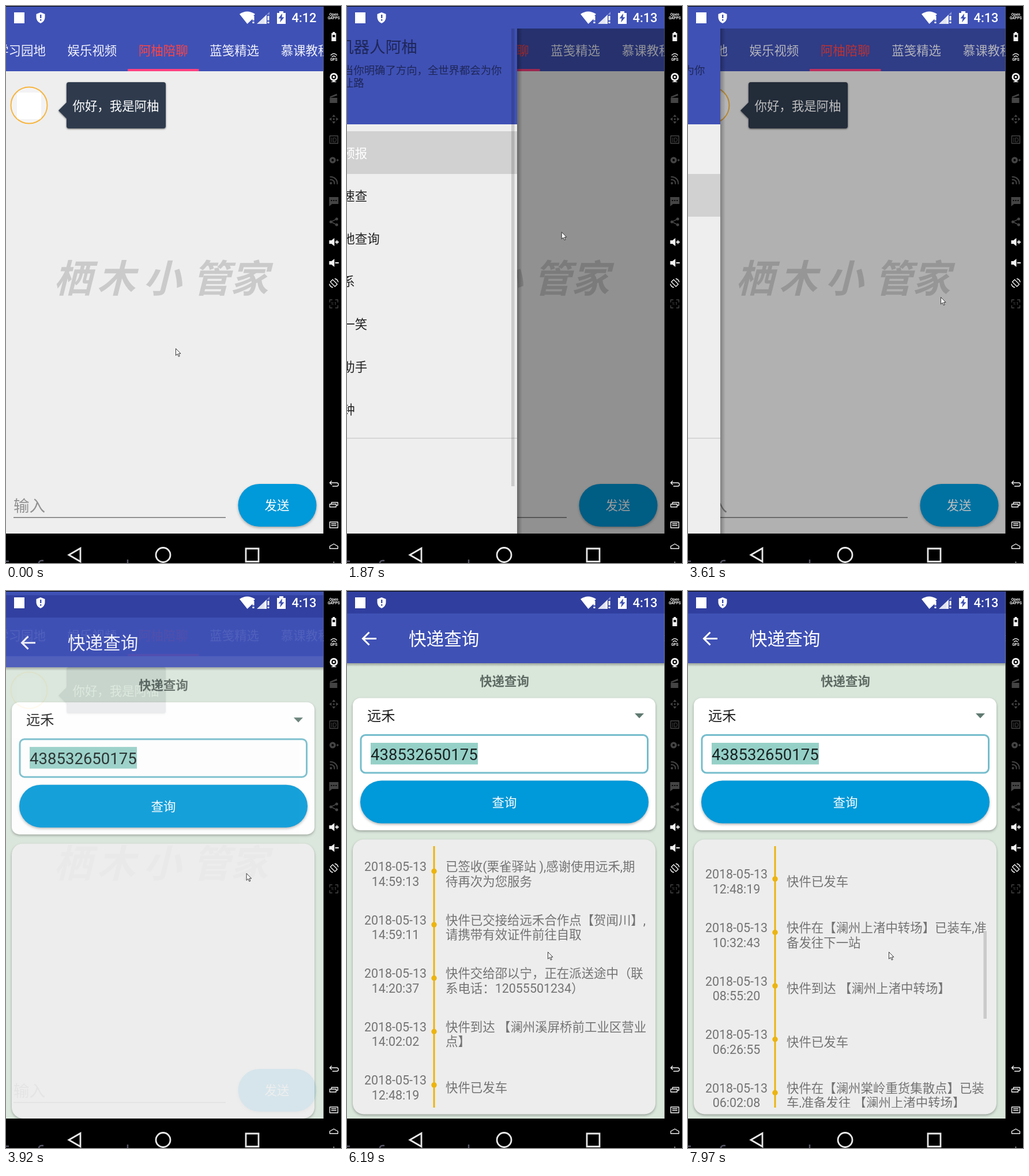
Recreate the animation shown at these times as an HTML page. Size 581x965 px, loop 8000 ms.

```html
<!DOCTYPE html>
<html lang="zh-CN">
<head>
<meta charset="utf-8">
<title>小管家</title>
<style>
html, body { margin: 0; width: 100%; height: 100%; overflow: hidden; background: #000; }
svg { display: block; width: 100vw; height: 100vh; }
text { font: 21.43px Roboto, "Noto Sans CJK SC", "Noto Sans CJK", sans-serif; white-space: pre; }
.mid { text-anchor: middle; }
.med { font-weight: 500; }
.big { font-size: 27.55px; }
.small { font-size: 18.37px; }
.line { fill: none; stroke: currentColor; stroke-width: 2; stroke-linejoin: round; stroke-linecap: round; }
.lift { filter: drop-shadow(0 2px 2px rgba(0,0,0,.3)); }
.tiny { font-size: 6.5px; font-weight: 700; }
</style>
</head>
<body>
<svg viewBox="0 0 581 965">
<defs>
  <clipPath id="screen"><path d="M0 1H550.4V914H0z"/></clipPath>
  <clipPath id="below"><path d="M0 39H551V914H0z"/></clipPath>
  <clipPath id="listBox"><path d="M10 442H535V895H10z"/></clipPath>
  <clipPath id="face"><circle cx="61" cy="98" r="49"/></clipPath>
  <linearGradient id="edge"><stop stop-color="#000" stop-opacity=".28"/><stop offset="1" stop-color="#000" stop-opacity="0"/></linearGradient>
  <linearGradient id="under" x2="0" y2="1"><stop stop-color="#000" stop-opacity=".3"/><stop offset="1" stop-color="#000" stop-opacity="0"/></linearGradient>
</defs>
<rect width="581" height="965"/>

<g clip-path="url(#screen)">
  <!-- chat screen -->
  <rect width="551" height="914" fill="#eee"/>
  <rect width="551" height="113" fill="#3f51b5"/>
  <g id="tabs" class="mid" fill="#f1f2fa"></g>
  <rect x="211" y="109" width="123.5" height="4" fill="#ff4081"/>
  <circle cx="40" cy="172" r="31.5" fill="#f3f3f5" stroke="#f7b53c" stroke-width="2"/>
  <rect x="19" y="150" width="42" height="46" rx="3" fill="#fff"/>
  <path d="M109 132H273Q277 132 277 136V208Q277 212 273 212H109Q105 212 105 208V195L91 181L105 167V136Q105 132 109 132z" fill="#2f3b4d" style="filter:drop-shadow(0 1px 1.5px rgba(0,0,0,.6))"/>
  <text x="115.5" y="180.5" fill="#fff">你好，我是阿柚</text>
  <text x="83 158 238 323 389" y="496" fill="#cacaca" style="font-size:66px;font-weight:700;font-style:italic">栖木小管家</text>
  <text class="big" x="13" y="876" fill="#929292">输入</text>
  <rect x="13" y="885.5" width="368" height="1.5" fill="#757575"/>
  <rect class="lift" x="402.5" y="828" width="136" height="74" rx="37" fill="#0099d9"/>
  <text class="mid" x="470" y="873" fill="#fff">发送</text>

  <!-- drawer -->
  <g clip-path="url(#below)">
    <rect id="scrim" y="39" width="551" height="875"/>
    <g id="drawer">
      <rect x="452" y="39" width="9" height="875" fill="url(#edge)"/>
      <rect y="39" width="452" height="875" fill="#eee"/>
      <rect y="39" width="452" height="166" fill="#3f51b5"/>
      <rect x="30" y="60" width="62" height="90" rx="4" fill="#eef4ff" clip-path="url(#face)"/>
      <circle cx="61" cy="98" r="50.5" fill="none" stroke="#78bfd0" stroke-width="1.6"/>
      <g fill="#1f2759">
        <text class="big" x="141" y="81">机器人阿柚</text>
        <text class="small" x="150" y="118">当你明确了方向，全世界都会为你</text>
        <text class="small" x="150" y="139.5">让路</text>
        <text class="small" x="11" y="184.5">您的生活小助手</text>
      </g>
      <rect id="mark" y="217" width="452" height="74" fill="#d1d1d1"/>
      <g id="rows"></g>
      <rect y="748" width="452" height="1.5" fill="#cfcfcf"/>
      <text class="med" x="20" y="795" fill="#757575">其它</text>
      <rect id="bar" x="442" y="39" width="5.5" height="793" fill-opacity=".15"/>
    </g>
  </g>

  <!-- parcel page -->
  <g id="page">
    <rect width="551" height="914" fill="#d9e6da"/>
    <rect y="125" width="551" height="6" fill="url(#under)"/>
    <rect width="551" height="125" fill="#3f51b5"/>
    <rect width="551" height="39" fill="#303f9f"/>
    <path d="M51 82.5H28M38.5 71.5L27.5 82.5L38.5 93.5" fill="none" stroke="#fff" stroke-width="3"/>
    <text x="107" y="93.5" fill="#fff" style="font-size:30.6px">快递查询</text>
    <text class="mid" x="273" y="164" fill="#5e6b64" style="font-weight:700">快递查询</text>
    <rect class="lift" x="10" y="185.5" width="525" height="229" rx="13" fill="#fff"/>
    <text x="35" y="225" fill="#1d1d1d" style="font-size:24.2px">远禾</text>
    <path d="M499 212H515L507 220.5z" fill="#5f7a70"/>
    <rect x="24" y="249.5" width="497.5" height="65.5" rx="8" fill="none" stroke="#76bdcc" stroke-width="3"/>
    <rect x="41" y="263" width="186" height="37.5" fill="#95d0c7"/>
    <text class="big" x="41" y="293" fill="#1b2424">438532650175</text>
    <rect id="query" class="lift" x="23" y="328.5" width="500" height="74" rx="37"/>
    <text class="mid" x="273" y="373.5" fill="#fff">查询</text>
    <rect class="lift" x="10" y="430.5" width="525" height="476" rx="19" fill="#ededed"/>
    <g id="result" clip-path="url(#listBox)">
      <rect x="149.5" y="442" width="3" height="453" fill="#ecb40f"/>
      <g id="list" fill="#737373"></g>
      <rect id="thumb" x="512.5" width="5.5" height="152" fill="#cacaca"/>
    </g>
  </g>

  <!-- status bar -->
  <g fill="#fff">
    <rect x="14" y="11" width="18" height="19"/>
    <path d="M60 11L67.5 14V20Q67 27 60 30Q53 27 52.5 20V14z"/>
    <path d="M59 15h2.4v6h-2.4zM59 23h2.4v2.5h-2.4z" fill="#3f51b5"/>
    <path d="M405 14Q418 5 432 14L428 18V22L418.5 31z"/>
    <path d="M427.5 17h3v8h-3zM427.5 27h3v3h-3zM453.5 17h3v8h-3zM453.5 27h3v3h-3z"/>
    <path d="M435 31L452 15V31z" opacity=".85"/><path d="M448 19L457 10V15H452V31H448z" opacity=".4"/>
    <path d="M470 12H474V9H481V12H485V31H470z"/>
    <path d="M479 13L472.5 21.5H476.5L475 28.5L482.5 19.5H478.5z" fill="#3f51b5"/>
    <text id="clock" class="med" x="495.5" y="28" style="font-size:21.8px"></text>
  </g>
</g>

<!-- navigation keys -->
<g fill="none" stroke="#e8e8e8" stroke-width="2.8">
  <path d="M109 951L129 939.5V962.5zM416 940H438V962.5H416z"/><circle cx="272.5" cy="951" r="12.5"/>
</g>
<path d="M0 962H5M57 965Q57 960 65 961M211 959V965" fill="none" stroke="#555566" stroke-width="2.5"/>
<g id="tools"></g>
<path id="cursor" d="M.5.5V12.5L3.3 9.8L5.3 14.3L7.2 13.5L5.3 9.2H9z" fill="#fff" stroke="#222" stroke-width=".9"/>
</svg>

<script>
const $ = id => document.getElementById(id);
const clamp = v => Math.max(0, Math.min(1, v));
const span = (t, a, b) => clamp((t - a) / (b - a));
const set = (id, attrs) => { for (const k in attrs) $(id).setAttribute(k, attrs[k]); };

$('tabs').innerHTML = ['学习园地', '娱乐视频', '阿柚陪聊', '蓝笺精选', '慕课教程'].map((s, i) =>
  `<text x="${26 + 123.4 * i}" y="84.5"${i == 2 ? ' fill="#ff4444"' : ''}>${s}</text>`).join('');

// menu icons, centred on 0,0
const gear = Array.from({length: 32}, (_, i) => {
  const r = i % 4 < 2 ? 18 : 14, a = (i - .5) * Math.PI / 16;
  return (r * Math.cos(a)).toFixed(1) + ' ' + (r * Math.sin(a)).toFixed(1);
}).join('L');
const menu = [
  ['天气预报', '<path class="line" style="stroke-width:1.6" d="M-8 15H10A6 6 0 0 0 11 3A8 8 0 0 0-4 1A7 7 0 0 0-8 15zM-10 1A7 7 0 1 1 2-6M-5-17V-14M-15-13L-13-11M-18-4H-15M5-13L3-11"/>'],
  ['快递速查', '<path d="M-10-8H7V7H-10zM8-5H14L18 1V7H8z"/><path class="line" d="M-17-5H-10M-18 0H-10M-14 5H-10"/><circle cx="-5" cy="8" r="3.5"/><circle cx="12" cy="8" r="3.5"/>'],
  ['归属地查询', '<path class="line" d="M-15-14L-10-15L-5-6L-9-2Q-5 6 2 9L6 5L15 11Q14 16 9 16Q-4 16-12 4Q-18-6-15-14zM2-11H12M8-15L12-11L8-7"/>'],
  ['常联系', '<path class="line" style="stroke-width:1.6" d="M-16 15Q-17 8-5 5V2Q-10-2-9-9Q-8-17 1-17Q10-17 10-9Q10-2 6 2V5Q17 8 17 15z"/>'],
  ['每日一笑', '<circle r="16"/><ellipse cx="-14.5" cy="1" rx="3" ry="4"/><ellipse cx="14.5" cy="1" rx="3" ry="4"/>'],
  ['翻译助手', '<circle r="13"/><text class="mid med" y="5.5" fill="#fff" style="font-size:15px">译</text>'],
  ['小闹钟', '<circle class="line" r="14" style="stroke-width:2.5"/><path class="line" d="M0-8V1H7M-15-8A5 5 0 0 1-8-15M15-8A5 5 0 0 0 8-15M-10 11L-13 16M10 11L13 16"/>'],
  ['设置', `<path class="line" style="stroke-width:1.7" d="M${gear}z"/><circle class="line" r="7.5"/>`]
];
$('rows').innerHTML = menu.map(([name, icon], i) => {
  const y = i == 7 ? 861 : 255 + 74 * i;
  return `<g class="row"><g transform="translate(38 ${y})" fill="currentColor">${icon}</g>` +
    `<text class="med" x="106.5" y="${y + 8}">${name}</text></g>`;
}).join('');
const rows = document.querySelectorAll('.row');

const news = [
  ['14:59:13', '已签收(栗雀驿站 ),感谢使用远禾,期', '待再次为您服务'],
  ['14:59:11', '快件已交接给远禾合作点【贺闻川】,', '请携带有效证件前往自取'],
  ['14:20:37', '快件交给邵以宁，正在派送途中（联', '系电话：12055501234）'],
  ['14:02:02', '快件到达 【澜州溪屏桥前工业区营业', '点】'],
  ['12:48:19', '快件已发车'],
  ['10:32:43', '快件在【澜州上渚中转场】已装车,准', '备发往下一站'],
  ['08:55:20', '快件到达 【澜州上渚中转场】'],
  ['06:26:55', '快件已发车'],
  ['06:02:08', '快件在【澜州棠岭重货集散点】已装', '车,准备发往 【澜州上渚中转场】']
];
$('list').innerHTML = news.map(([time, a, b], i) => {
  const y = 485.5 + 92.6 * i;
  return `<circle cx="151" cy="${y}" r="4.7" fill="#ecb40f"/>
    <text class="mid" x="84" y="${y - .5}">2018-05-13</text><text class="mid" x="84" y="${y + 25}">${time}</text>
    <text x="171" y="${b ? y - .5 : y + 12}">${a}</text>` + (b ? `<text x="171" y="${y + 25}">${b}</text>` : '');
}).join('');

// emulator toolbar: [y, shade, drawing centred on 0,0]
const stroke = (d, w = 1.4) => `<path class="line" style="stroke-width:${w}" d="${d}"/>`;
const label = (s, y) => `<text class="mid tiny" y="${y}">${s}</text>`;
const speaker = '<path d="M-8-3H-4L1-7V7L-4 3H-8z"/>';
const dim = '#444', lit = '#f2f2f2';
const tools = [
  [18, lit, label('Open', -1) + label('GAPPS', 5)],
  [53, lit, '<path d="M-4-6H-2V-8H2V-6H4V8H-4z"/><path d="M-2-3H2V1H-2z" fill="#000"/>'],
  [89, lit, stroke('M-5-4Q0-9 5-4M-3-1Q0-4 3-1') + label('GPS', 6)],
  [124, lit, '<circle r="7" cy="-1"/><path d="M-5 8Q0 4 5 8z"/><circle r="4" cy="-1" fill="#000"/><circle r="2" cy="-1"/>'],
  [160, dim, '<path d="M-7-1H6V8H-7zM-7-3L5-8L6-5L-6-1z"/>'],
  [196, dim, '<path d="M0-8L3-4H-3zM0 8L3 4H-3zM-8 0L-4-3V3zM8 0L4-3V3z"/><circle r="1.5"/>'],
  [231, dim, stroke('M-7-6H7V7H-7z') + '<text class="mid" y="4.5" style="font-size:11px">ID</text>'],
  [267, dim, '<circle cx="-2" r="5.5"/><circle cx="-2" r="2" fill="#000"/>' + stroke('M5 0H8M6.5-1.5V1.5')],
  [302, dim, '<circle cx="-5" cy="5" r="2"/>' + stroke('M-6-1A6 6 0 0 1 1 6M-6-6A11 11 0 0 1 6 6', 2)],
  [338, dim, '<path d="M-8-7H8V5H-3L-8 9z"/><path d="M-5-2H-3V0H-5zM-1-2H1V0H-1zM3-2H5V0H3z" fill="#000"/>'],
  [374, dim, stroke('M5-5L-5 0L5 5') + '<circle cx="5" cy="-5" r="2.5"/><circle cx="-5" r="2.5"/><circle cx="5" cy="5" r="2.5"/>'],
  [409, lit, speaker + stroke('M3 0H8M5.5-2.5V2.5', 1.8)],
  [445, lit, speaker + stroke('M3 0H8', 1.8)],
  [480, lit, stroke('M-2-6L6 2L2 6L-6-2zM2-7.5A7.500 7.500 0 0 1 7.500-2M-2 7.500A7.500 7.500 0 0 1-7.500 2')],
  [516, dim, stroke('M-7-3V-7H-3M3-7H7V-3M7 3V7H3M-3 7H-7V3') + label('1:1', 2)],
  [828, lit, stroke('M-4-5L-7-2L-4 1M-7-2H5Q8-2 8 1Q8 4 5 4H-2')],
  [864, lit, stroke('M-7-1H4V4H-7zM-4-1V-4H7V1H4')],
  [899, lit, stroke('M-7-5H7V5H-7zM-4-2H4M-4 1H4')],
  [936, lit, stroke('M-7 4V0L0-4L7 0V4z')],
  [970, '#aaa', stroke('M0-7V-2M-4-4A6 6 0 0 0-6 2M4-4A6 6 0 0 1 6 2')]
];
$('tools').innerHTML = tools.map(([y, c, art]) =>
  `<g transform="translate(568.5 ${y})" fill="${c}" color="${c}">${art}</g>`).join('');

// pointer path: time, x, y
const path = [
  [0, 294, 593], [50, 294, 593], [700, 40, 338], [860, 5, 362], [940, 4, 361], [1060, 4, 361], [1250, 1, 369],
  [1450, 1, 369], [1630, 308, 366], [1800, 390, 385], [2520, 205, 448], [3220, 181, 330],
  [3370, 181, 330], [3610, 438, 504], [3690, 442, 515], [3850, 430, 505], [4460, 315, 366], [5050, 315, 366],
  [5400, 365, 591], [5560, 365, 591], [5870, 368, 569], [6000, 368, 569], [6190, 348, 625], [8000, 348, 625]
];
// list scroll: time, offset
const scrolls = [[0, 0], [6490, 7], [6560, 14], [6640, 21], [7040, 68], [7110, 115], [7190, 161], [7500, 259], [7970, 357]];

function draw(t) {
  const i = path.findIndex(p => p[0] > t), [a, b] = [path[i - 1], path[i]], k = span(t, a[0], b[0]);
  set('cursor', {transform: `translate(${a[1] + (b[1] - a[1]) * k} ${a[2] + (b[2] - a[2]) * k})`});

  const open = Math.sin(span(t, 1476, 2350) * Math.PI / 2), shut = span(t, 3370, 3690);
  const shown = open * (1 - shut) ** 1.49;
  set('drawer', {transform: `translate(${Math.round(452 * (shown - 1))} 0)`, opacity: shown > 0 ? 1 : 0});
  set('scrim', {opacity: .6 * open * (1 - shut * shut)});
  set('bar', {opacity: 1 - span(t, 2900, 3120)});
  const picked = t < 3370 ? 0 : 1;
  set('mark', {y: 217 + 74 * picked});
  rows.forEach((row, n) => {
    row.setAttribute('color', n == picked ? '#fff' : '#6e6e6e');
    row.setAttribute('fill', n == picked ? '#fff' : '#1f1f1f');
  });

  const enter = span(t, 3660, 4150);
  set('page', {opacity: clamp(enter * 1.7), transform: `translate(0 ${70 * (1 - enter) ** 3})`});
  set('query', {fill: t >= 4930 && t < 5160 ? '#76bdcc' : '#0099d9'});
  set('result', {opacity: span(t, 5500, 5870)});
  const offset = scrolls.filter(s => s[0] <= t).pop()[1];
  set('list', {transform: `translate(0 ${-offset})`});
  set('thumb', {y: 442 + offset * 147 / 357, opacity: offset ? 1 : 0});
  $('clock').textContent = t < 1480 ? '4:12' : '4:13';
}

const start = performance.now();
(function tick() {
  draw((performance.now() - start) % 8000);
  requestAnimationFrame(tick);
})();
</script>
</body>
</html>
```
